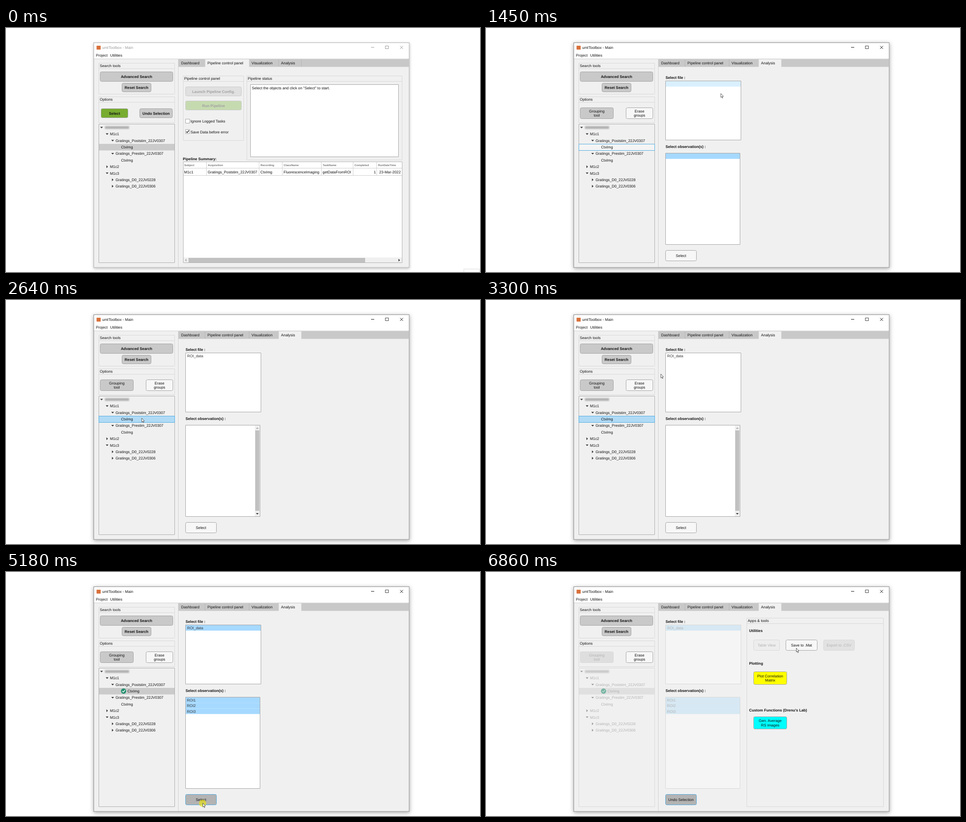
An HTML page with a canvas that plays this animation: 1044 by 537 pixels, repeating every 8.46 s.

```html
<!DOCTYPE html>
<html lang="en">
<head>
<meta charset="utf-8">
<title>Analysis tab demo</title>
<style>
html, body { margin: 0; width: 100%; height: 100%; overflow: hidden; background: #fff; }
canvas { display: block; }
</style>
</head>
<body>
<canvas id="stage" width="1044" height="537"></canvas>
<script>
const ctx = document.getElementById('stage').getContext('2d');
const LOOP = 8460;
const FACE = '"Liberation Sans", Arial, sans-serif';
const INK = '#111', DIM = '#b2b2b2', GREY = '#c9c9c9', PANEL = '#f0f0f0', PALE = '#f7f7f7';
const LINE = '#d8d8d8', EDGE = '#a4a4a4', BLUE = '#a6d9ff', HOVER = '#d9f0ff', FOCUS = '#4fabdf';

// Moments at which the interface changes, in ms
const AT = {
  active: 970, analysis: 1180, hoverFile: 1320, leaveFile: 1660, treeClick: 2290, fileShown: 2430,
  overFile: 3720, filePick: 3790, listFilled: 3860, pick1: 4000, pick2: 4140, hover3: 4210,
  pick3: 4350, press: 5180, apps: 5320, locked: 5390
};

// Pointer path: time, x, y
const PATH = [
  [70, 1024, 530], [480, 850, 320], [900, 627, 79], [1110, 627, 79], [1450, 517, 143.5],
  [1800, 393, 210], [2150, 298.5, 259.5], [2850, 298.5, 259.5], [3300, 384.5, 162.5],
  [3650, 416, 117], [3790, 416, 118], [4000, 424, 278], [4140, 428, 302], [4280, 433, 344],
  [4560, 433, 472], [4900, 433, 508], [5680, 433, 508], [6100, 560, 335], [6510, 670, 188],
  [6860, 683, 167], [LOOP, 683, 167]
];
const CLICKS = [[970, 1180], [2220, 2500], [3720, 3860], [3980, 4200], [5040, 5460]];

function text(s, x, cy, { color = INK, bold = false, size = 8.25, align = 'left' } = {}) {
  ctx.font = `${bold ? 'bold ' : ''}${size}px ${FACE}`;
  ctx.textAlign = align;
  ctx.fillStyle = color;
  ctx.fillText(s, x, cy + 3);
}

function fill(x, y, x2, y2, color) {
  ctx.fillStyle = color;
  ctx.fillRect(x, y, x2 - x, y2 - y);
}

function box(x, y, x2, y2, color, edge = EDGE, radius = 0) {
  ctx.beginPath();
  ctx.roundRect(x + .5, y + .5, x2 - x - 1, y2 - y - 1, radius);
  if (color) { ctx.fillStyle = color; ctx.fill(); }
  ctx.strokeStyle = edge;
  ctx.lineWidth = 1;
  ctx.stroke();
}

function shape(points, color) {
  ctx.beginPath();
  points.forEach(([x, y]) => ctx.lineTo(x, y));
  ctx.closePath();
  ctx.fillStyle = color;
  ctx.fill();
}

// Separate segments, two points each
function stroke(points, color = INK, width = 1) {
  ctx.beginPath();
  points.forEach(([x, y], i) => i % 2 ? ctx.lineTo(x, y) : ctx.moveTo(x, y));
  ctx.strokeStyle = color;
  ctx.lineWidth = width;
  ctx.stroke();
}

function button(label, x, y, x2, y2, color = PALE, { edge = EDGE, ...style } = {}) {
  box(x, y, x2, y2, color, edge, 3);
  const lines = label.split('\n');
  lines.forEach((s, i) => text(s, (x + x2) / 2, (y + y2) / 2 + (i - (lines.length - 1) / 2) * 9.4,
    { align: 'center', ...style }));
}

function group(title, x, y, x2, y2) {
  box(x, y, x2, y2, null, LINE);
  fill(x, y + 12, x2, y + 13, LINE);
  text(title, x + 2.5, y + 6.3);
}

// Small triangle pointing along the given quarter turn (0 = right)
function arrow(x, y, turn, color = '#333') {
  ctx.save();
  ctx.translate(x, y);
  ctx.rotate(turn * Math.PI / 2);
  shape([[-1.5, -3], [1.8, 0], [-1.5, 3]], color);
  ctx.restore();
}

function drawWindow(t) {
  const active = t >= AT.active;
  ctx.save();
  ctx.shadowColor = active ? 'rgba(0,0,0,.34)' : 'rgba(0,0,0,.25)';
  ctx.shadowBlur = active ? 9 : 6;
  ctx.shadowOffsetY = 2;
  fill(193, 32, 888.5, 527.5, PANEL);
  ctx.restore();
  fill(193, 32, 888, 68, '#fff');
  fill(193, 67.5, 888, 68.5, '#cfcfcf');
  ctx.strokeStyle = active ? '#868686' : '#acacac';
  ctx.lineWidth = 1;
  ctx.strokeRect(193.3, 32.3, 694.7, 494.7);
  fill(199.5, 39, 208.5, 47.5, '#d8703a');
  const ink = active ? INK : '#999';
  text('umIToolbox - Main', 212, 43, { color: ink, size: 8.35 });
  stroke([[804, 42.5], [811, 42.5]], ink);
  box(835, 39, 843, 46, null, active ? '#444' : ink);
  stroke([[868, 39.5], [874.5, 46], [874.5, 39.5], [868, 46]], ink);
  text('Project', 198, 59.5);
  text('Utilities', 229.5, 59.5);
}

function drawTabs(analysis) {
  fill(379, 68.5, 380, 526, '#d2d2d2');
  fill(380, 68.5, 887.5, 85.5, '#c8c8c8');
  const edges = [380, 438, 535, 600, 650];
  ['Dashboard', 'Pipeline control panel', 'Visualization', 'Analysis'].forEach((name, i) => {
    if (i === (analysis ? 3 : 1)) fill(edges[i] + .5, 69, edges[i + 1] + .5, 86, PANEL);
    else fill(edges[i + 1], 69, edges[i + 1] + 1, 85, '#b8b8b8');
    text(name, edges[i] + 5.8, 77);
  });
}

const TREE = [
  ['', 0, 1], ['M1c1', 1, 1], ['Gratings_Poststim_22JV0307', 2, 1], ['CtxImg', 3],
  ['Gratings_Prestim_22JV0307', 2, 1], ['CtxImg', 3], ['M1c2', 1, 0], ['M1c3', 1, 1],
  ['Gratings_D0_22JV0228', 2, 0], ['Gratings_D0_22JV0306', 2, 0]
];

function drawTree(t, locked) {
  const picked = t >= AT.filePick;
  const checked = t >= AT.listFilled;
  const color = locked ? DIM : INK;
  box(204, 211, 372, 517, null, locked ? LINE : '#acacac');
  if (t < AT.analysis || picked) fill(205, 255, 371, 269.5, locked ? '#e0e0e0' : '#cbcbcb');
  else box(204, 255, 372, 270, t < AT.treeClick ? '#f4f4f4' : '#b1daf5', FOCUS);
  TREE.forEach(([name, level, open], i) => {
    const y = 219 + i * 14.36;
    const x = 216.8 + level * 12.2;
    const ticked = i === 3 && checked;
    if (open !== undefined) arrow(x - 6.3, y, open, locked ? '#999' : '#333');
    text(name, x + (ticked ? 14.2 : 0), y, { color });
    if (!ticked) return;
    ctx.globalAlpha = locked ? .55 : 1;
    ctx.beginPath();
    ctx.arc(259, y, 5.8, 0, 7);
    ctx.fillStyle = '#23906f';
    ctx.fill();
    stroke([[256, y], [258.4, y + 2.4], [258.2, y + 2.4], [262.2, y - 2.3]], '#fff', 1.4);
    ctx.globalAlpha = 1;
  });
  ctx.save();
  ctx.filter = 'blur(1.6px)';
  fill(218, 216, 271, 222, locked ? '#c9c9c9' : '#b0b0b0');
  ctx.restore();
}

function drawSidebar(t, analysis, locked) {
  const bold = true;
  group('Search tools', 204, 77, 372, 146);
  button('Advanced Search', 207, 96, 368, 118, GREY, { bold });
  button('Reset Search', 255, 121, 320, 141, GREY, { bold });
  group('Options', 204, 151, 372, 209);
  if (analysis) {
    button('Grouping\ntool', 207, 175, 281, 200, locked ? '#dedede' : GREY,
      locked ? { color: DIM, edge: LINE } : {});
    button('Erase\ngroups', 308, 175, 368, 200);
  } else {
    button('Select', 209, 177, 269, 198, '#77ac30', { bold });
    button('Undo Selection', 294, 177, 367, 198, GREY, { bold });
  }
  drawTree(t, locked);
}

function drawPipeline() {
  const off = { bold: true, color: '#a0a0a0', edge: '#cbcbcb' };
  group('Pipeline control panel', 390, 105, 524, 248);
  button('Launch Pipeline Config.', 395, 129, 519, 150, '#e0e0e0', off);
  button('Run Pipeline', 395, 160, 519, 181, '#c6dab0', off);
  box(395, 200, 405, 210, '#fff');
  box(395, 223, 405, 233, '#fff');
  stroke([[397, 228], [399.2, 230.4], [399, 230.4], [403, 225.2]], '#222', 1.5);
  text('Ignore Logged Tasks', 406.5, 205);
  text('Save Data before error', 406.5, 228.5);

  group('Pipeline status', 530, 105, 873, 291);
  box(538, 124, 865, 284, '#fff');
  text('Select the objects and click on "Select" to start.', 541.5, 132);

  text('Pipeline Summary:', 389.5, 288, { bold: true });
  box(390, 294, 873, 517, '#fff', '#b0b0b0');
  const columns = [
    [390, 'Subject', 'M1c1'], [442, 'Acquisition', 'Gratings_Poststim_22JV0307'],
    [558, 'Recording', 'CtxImg'], [609, 'ClassName', 'FluorescenceImaging'],
    [695, 'TaskName', 'getDataFromROI'], [765, 'Completed', '1'], [817, 'RunDateTime', '23-Mar-2022']
  ];
  columns.forEach(([x, head, value], i) => {
    if (i) fill(x - 1, 295, x, 325, '#cfcfcf');
    text(head, x + 2.5, 301, { bold: true, size: 6.15, color: '#777' });
    if (i === 5) text(value, 814.5, 316.5, { align: 'right' });
    else text(value, x + (i === 6 ? 5 : 2.3), 316.5);
  });
  fill(391, 308, 872, 309, '#cfcfcf');
  fill(391, 324, 872, 325, '#cfcfcf');
  fill(391, 505, 872, 516, PANEL);
  fill(402, 506, 791, 516, '#c1c1c1');
  arrow(396, 511, 2, '#aaa');
  arrow(866, 511, 0);
}

function drawAnalysis(t, locked) {
  const bold = true;
  const color = locked ? DIM : '#333';
  const chosen = locked ? '#d6e8f3' : BLUE;
  const paper = locked ? '#f5f5f5' : '#fff';
  const border = locked ? LINE : EDGE;
  const picked = t >= AT.filePick;

  text('Select file :', 395.5, 109.3, { bold });
  box(395, 116, 562, 247, paper, picked && t < AT.press ? FOCUS : border);
  const hover = (t >= AT.hoverFile && t < AT.leaveFile) || t >= AT.overFile;
  if (picked || hover) fill(396, 117, 561, 129, picked ? chosen : HOVER);
  if (t >= AT.fileShown) text('ROI_data', 399, 123, { color });

  text('Select observation(s) :', 395.5, 261.3, { bold });
  box(395, 275, 560, 477, paper, border);
  if (t < AT.fileShown) fill(396, 276, 559, 288, BLUE);
  else if (t < AT.listFilled) {
    fill(548, 276, 559, 476, PANEL);
    fill(549, 287, 558, 464, '#c1c1c1');
    arrow(553.5, 282, 3, '#aaa');
    arrow(553.5, 470.5, 1);
  } else {
    [AT.pick1, AT.pick2, AT.pick3].forEach((time, i) => {
      const y = 276 + i * 12.2;
      if (t >= time) fill(396, y, 559, y + 12.2, chosen);
      else if (i === 2 && t >= AT.hover3) fill(396, y, 559, y + 12.2, HOVER);
      text('ROI' + (i + 1), 398.5, y + 6.2, { color });
    });
  }

  const pressed = t >= AT.press;
  button(t >= AT.apps ? 'Undo Selection' : 'Select', 395, 489, 464, 513,
    pressed ? '#b3b3b3' : PALE, { edge: pressed ? FOCUS : EDGE });
  if (t >= AT.apps) drawApps();
}

function drawApps() {
  const bold = true;
  const off = { color: DIM, edge: LINE };
  group('Apps & tools', 574, 101, 876, 517);
  text('Utilities', 579.5, 129, { bold });
  button('Table View', 589, 149, 647, 173, '#ededed', off);
  button('Save to .Mat', 660, 149, 730, 173);
  button('Export to .CSV', 743, 149, 812, 173, '#e2e2e2', off);
  text('Plotting', 579.5, 201, { bold });
  button('Plot Correlation\nMatrix', 589, 219, 663, 248, '#ff0');
  text("Custom Functions (Drenu's Lab)", 579.5, 303.5, { bold });
  button('Gen. Average\nRS images', 589, 318, 663, 346, '#0ff');
}

function pointerAt(t) {
  const i = PATH.findIndex(p => p[0] > t);
  const [t0, x0, y0] = PATH[i - 1], [t1, x1, y1] = PATH[i];
  const k = (t - t0) / (t1 - t0);
  return [x0 + (x1 - x0) * k, y0 + (y1 - y0) * k];
}

function drawPointer(t) {
  const [x, y] = pointerAt(t);
  if (CLICKS.some(([from, to]) => t >= from && t < to)) {
    ctx.beginPath();
    ctx.arc(x, y + 1, 8, 0, 7);
    ctx.fillStyle = 'rgba(240,230,0,.6)';
    ctx.fill();
  }
  const outline = [[.5, .5], [.5, 9], [2.4, 7.3], [3.8, 10.6], [5.1, 10], [3.8, 6.9], [6.3, 6.7]];
  shape(outline.map(([dx, dy]) => [x + dx, y + dy]), '#fff');
  ctx.strokeStyle = '#333';
  ctx.lineWidth = .8;
  ctx.stroke();
}

function draw(t) {
  const analysis = t >= AT.analysis;
  const locked = t >= AT.locked;
  ctx.textRendering = 'geometricPrecision';
  fill(0, 0, 1044, 537, '#fff');
  drawWindow(t);
  drawTabs(analysis);
  drawSidebar(t, analysis, locked);
  if (analysis) drawAnalysis(t, locked);
  else drawPipeline();
  if (t >= 70) drawPointer(t);
  else box(1008, 530, 1043, 540, '#fff', '#dcdcdc');
}

const start = performance.now();
function frame() {
  draw((performance.now() - start) % LOOP);
  requestAnimationFrame(frame);
}
frame();
</script>
</body>
</html>
```
